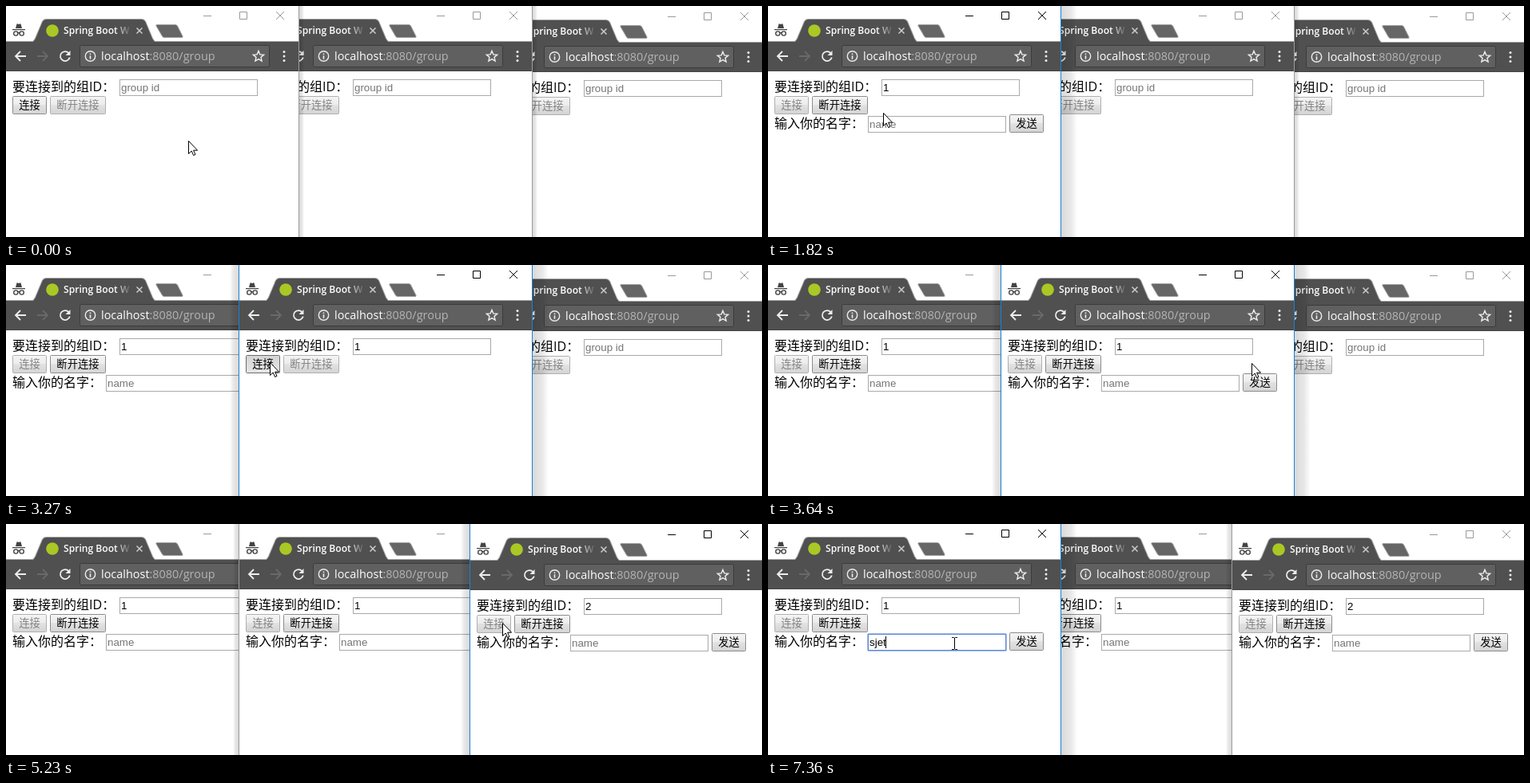
An HTML page for the animation above (8000 ms loop, 946 by 290 pixels).

```html
<!DOCTYPE html>
<html lang="zh">
<head>
<meta charset="utf-8">
<title>Group chat demo</title>
<style>
html, body { margin: 0; width: 100%; height: 100%; overflow: hidden; background: #fff; }
svg { display: block; width: 946px; height: 290px; }
text { white-space: pre; }
.ui { font-family: "Open Sans", "Noto Sans", sans-serif; }
.page { font: 16px "Open Sans", "Noto Sans CJK SC", "Noto Sans CJK", sans-serif; }
.btn { font: 13.333px "Noto Sans CJK SC", "Noto Sans CJK", sans-serif; text-anchor: middle; }
.field { font: 13.333px "Liberation Sans", Arial, sans-serif; }
</style>
</head>
<body>
<svg viewBox="0 0 946 290">
  <defs>
    <linearGradient id="fade" gradientUnits="userSpaceOnUse" x1="136" x2="157" y1="0" y2="0">
      <stop offset="0" stop-color="#fff"/><stop offset="1" stop-color="#fff" stop-opacity="0"/>
    </linearGradient>
    <linearGradient id="shade">
      <stop offset="0" stop-opacity=".15"/><stop offset=".6" stop-opacity=".09"/><stop offset="1" stop-opacity="0"/>
    </linearGradient>
    <linearGradient id="idle" x2="0" y2="1">
      <stop offset="0" stop-color="#f4f4f4"/><stop offset=".5" stop-color="#ececec"/>
      <stop offset=".5" stop-color="#e2e2e2"/><stop offset="1" stop-color="#d4d4d4"/>
    </linearGradient>
    <linearGradient id="hover" x2="0" y2="1">
      <stop offset="0" stop-color="#fafafa"/><stop offset="1" stop-color="#dedede"/>
    </linearGradient>
    <linearGradient id="press" x2="0" y2="1">
      <stop offset="0" stop-color="#d4d4d4"/><stop offset="1" stop-color="#e6e6e6"/>
    </linearGradient>
  </defs>
  <g id="stage"></g>
</svg>
<script>
const LOOP = 8000;
const stage = document.getElementById('stage');

// Times at which each window's form moves on
const windows = {
  A: { x: 0, y: 0, id: '1', focus: 700, typed: 1100, hover: 1380, press: 1670, conn: 1820, caretOff: 1520 },
  B: { x: 292, y: 0, id: '1', focus: 2450, typed: 2720, hover: 2990, press: 3270, conn: 3390 },
  C: { x: 581, y: 1, id: '2', focus: 4180, typed: 4300, hover: 4870, press: 4990, conn: 5110 }
};

// Stacking from back to front, and the active window
const layers = [
  [0, 'CBA', ''], [700, 'CBA', 'A'], [2450, 'CAB', 'B'], [4180, 'ABC', 'C'], [6290, 'BCA', 'A']
];

// Name field of window A: text and caret position
const nameSteps = [[6290, '', 127], [6810, '', 0], [7090, 'sj', 137], [7360, 'sjet', 147]];

// Pointer: time, x, y, shape
const pointer = [
  [0, 228, 169, 'arrow'], [400, 216, 131, 'arrow'], [550, 210.5, 110, 'beam'], [1100, 0, 0, ''],
  [1250, 154.5, 109, 'beam'], [1380, 40, 119, 'arrow'], [1520, 38, 121, 'arrow'], [1670, 38, 122, 'arrow'],
  [1820, 144, 134, 'arrow'], [1940, 250, 151, 'arrow'], [2060, 350, 148, 'arrow'], [2180, 440, 132, 'arrow'],
  [2300, 504.5, 110, 'beam'], [2720, 0, 0, ''], [2870, 491.5, 110, 'beam'], [2990, 330, 122, 'arrow'],
  [3520, 470, 130, 'arrow'], [3640, 605, 123, 'arrow'], [3760, 715, 117, 'arrow'], [3910, 750, 113, 'arrow'],
  [4060, 768.5, 110, 'beam'], [4300, 0, 0, ''], [4420, 720, 107, 'arrow'], [4570, 671, 123, 'arrow'],
  [4720, 649, 126, 'arrow'], [4870, 621, 124, 'arrow'], [5350, 585, 139, 'arrow'], [5500, 505, 138, 'arrow'],
  [5620, 420, 136, 'arrow'], [5740, 340, 134, 'arrow'], [5860, 280.5, 150, 'beam'], [6010, 250.5, 148, 'beam'],
  [6140, 233.5, 150, 'beam']
];

const shapes = {
  arrow: '<path d="M.5 .5V16.5L4.2 13L6.6 18.5L9 17.5L6.6 12.2H11.6Z" fill="#fff" stroke="#000"/>',
  beam: '<path d="M-3.5 -7.5H-1L0 -6.8L1 -7.5H3.5M0 -7V7M-3.5 7.5H-1L0 6.8L1 7.5H3.5" fill="none" stroke="#000"/>'
};

const at = (steps, t) => steps.filter(s => s[0] <= t).pop();
const rect = (x, y, w, h, fill, more = '') =>
  `<rect x="${x}" y="${y}" width="${w}" height="${h}" fill="${fill}" ${more}/>`;
const line = (d, stroke, width = 1) => `<path d="${d}" fill="none" stroke="${stroke}" stroke-width="${width}"/>`;
const text = (x, y, cls, fill, s, more = '') => `<text x="${x}" y="${y}" class="${cls}" fill="${fill}" ${more}>${s}</text>`;

function star(cx, cy, r) {
  const pts = Array.from({ length: 10 }, (_, i) => {
    const a = i * Math.PI / 5 - Math.PI / 2, q = i % 2 ? r * 0.45 : r;
    return (cx + q * Math.cos(a)).toFixed(2) + ',' + (cy + q * Math.sin(a)).toFixed(2);
  });
  return `<polygon points="${pts.join(' ')}" fill="none" stroke="#eee" stroke-width="1.4"/>`;
}

function button(x, y, w, label, look) {
  const off = look === 'off';
  const border = { off: '#b0b0b0', idle: '#8c8c8c', hover: '#6c6c6c', press: '#6c6c6c' }[look];
  return rect(x + .5, y + .5, w - 1, 22, `url(#${off ? 'idle' : look})`, `stroke="${border}" rx="1"`) +
    text(x + w / 2, y + 16.2, 'btn', off ? '#838383' : '#000', label);
}

function field(x, y, value, hint, focused, caret) {
  const ring = rect(x - .5, y - .5, 174, 22, '#fff', 'stroke="#a3bff2" rx="1.5"') +
    rect(x + .5, y + .5, 172, 20, '#fff', 'stroke="#5f86cf"');
  const box = focused ? ring : rect(x + .5, y + .5, 172, 20, '#fff', 'stroke="#a9a9a9"');
  return box + text(x + 2, y + 15, 'field', value ? '#000' : '#757575', value || hint) +
    (caret ? rect(caret, y + 3, 1, 15, '#000') : '');
}

function chrome(active) {
  const ctl = active ? '#000' : '#999';
  const edge = '#a0a0a0';
  const tab = 'M32.500 46Q35.500 44 37 41L46 19.500Q47.500 17 50 17H170Q172.500 17 174 19.500L183 41Q184.500 44 187.500 46Z';
  return line('M247 12.5H257M292.5 7.5H301.5V16.5H292.5Z', ctl) + line('M338 7L348 17M348 7L338 17', ctl) +
    // private-mode badge
    '<path d="M12 28L13.5 22.5Q14 22 16 23Q18 22 18.5 22.5L20 28ZM8 29H24V30.3H8Z" fill="#444"/>' +
    '<g fill="none" stroke="#444" stroke-width="1.4"><circle cx="12.3" cy="34.5" r="2.6"/><circle cx="19.7" cy="34.5" r="2.6"/><path d="M14.8 34Q16 33 17.2 34"/></g>' +
    // tab, new-tab button and toolbar
    line(tab, edge, 2) + rect(0, 44, 366, 1, edge) +
    `<path d="${tab}" fill="#505050"/>` +
    `<path d="M188.500 23.500H212Q213.500 23.500 214.500 25L221 38Q221.500 39.500 220 39.500H198Q196.500 39.500 195.500 38L188 25Q187.500 23.500 188.500 23.500Z" fill="#666" stroke="${edge}"/>` +
    rect(0, 45, 366, 37, '#505050') + rect(0, 81, 366, 1, '#444') +
    '<circle cx="58" cy="31" r="7.8" fill="#aac824"/>' +
    text(72, 35.3, 'ui', 'url(#fade)', 'Spring Boot W', 'font-size="12.1" font-weight="600"') +
    line('M163.500 27.500L170.500 34.500M170.500 27.500L163.500 34.500', '#ccc', 1.5) +
    line('M25 63H12.500M18 57L12 63L18 69', '#eee', 1.8) +
    line('M39 63H51.500M46 57L52 63L46 69', '#696969', 1.8) +
    line('M78.600 59.200A6 6 0 1 0 79.800 64.500', '#eee', 1.8) +
    '<path d="M80.500 56V62H74.500Z" fill="#eee"/>' +
    // address bar
    rect(92.5, 49.5, 237, 27, '#606060', 'stroke="#3b3b3b" rx="2"') +
    '<circle cx="105.5" cy="63" r="6.200" fill="none" stroke="#eee" stroke-width="1.400"/>' +
    rect(104.7, 59.5, 1.6, 1.6, '#eee') + rect(104.7, 62.3, 1.6, 4.4, '#eee') +
    text(119, 68, 'ui', '#fff', 'localhost<tspan fill="#b4b4b4">:8080/group</tspan>', 'font-size="14.45"') +
    star(316, 63.4, 7) +
    [57.5, 63, 68.5].map(y => `<circle cx="348" cy="${y}" r="1.500" fill="#eee"/>`).join('');
}

function form(w, t, named) {
  const on = t >= w.conn;
  const focused = t >= w.focus && t < w.press;
  const typed = t >= w.typed;
  const caret = focused && !(t >= w.caretOff) ? (typed ? 152 : 144) : 0;
  const look = on ? 'off' : t >= w.press ? 'press' : t >= w.hover ? 'hover' : 'idle';
  let out = text(8, 107, 'page', '#000', '要连接到的组ID：') +
    field(142, 92, typed ? w.id : '', 'group id', focused, caret) +
    button(8, 113, 43, '连接', look) +
    button(55, 113, 70, '断开连接', on ? 'idle' : 'off');
  if (on) {
    out += text(8, 153, 'page', '#000', '输入你的名字：') +
      field(125, 138, named ? named[1] : '', 'name', !!named, named && named[2]) +
      button(302, 136, 43, '发送', 'idle');
  }
  return out;
}

function drawWindow(key, t, active) {
  const w = windows[key];
  const named = key === 'A' ? at(nameSteps, t) : null;
  const right = active ? 20 : 6, left = active ? 11 : 7;
  return `<g transform="translate(${w.x} ${w.y})">` +
    rect(367, -1, right, 292, 'url(#shade)') +
    rect(1, -1, left, 292, 'url(#shade)', 'transform="scale(-1 1)"') +
    rect(-1, -1, 368, 292, '#fff') +
    line('M-.5 -1V291M366.5 -1V291', active ? '#1883d7' : '#9c9c9c') +
    chrome(active) + form(w, t, named) + '</g>';
}

function draw(t) {
  const [, order, active] = at(layers, t);
  const [, x, y, shape] = at(pointer, t);
  return [...order].map(k => drawWindow(k, t, k === active)).join('') +
    (shape ? `<g transform="translate(${x} ${y})">${shapes[shape]}</g>` : '');
}

let last = '';
function tick(now) {
  const markup = draw(now % LOOP);
  if (markup !== last) stage.innerHTML = last = markup;
  requestAnimationFrame(tick);
}
tick(performance.now());
</script>
</body>
</html>
```
